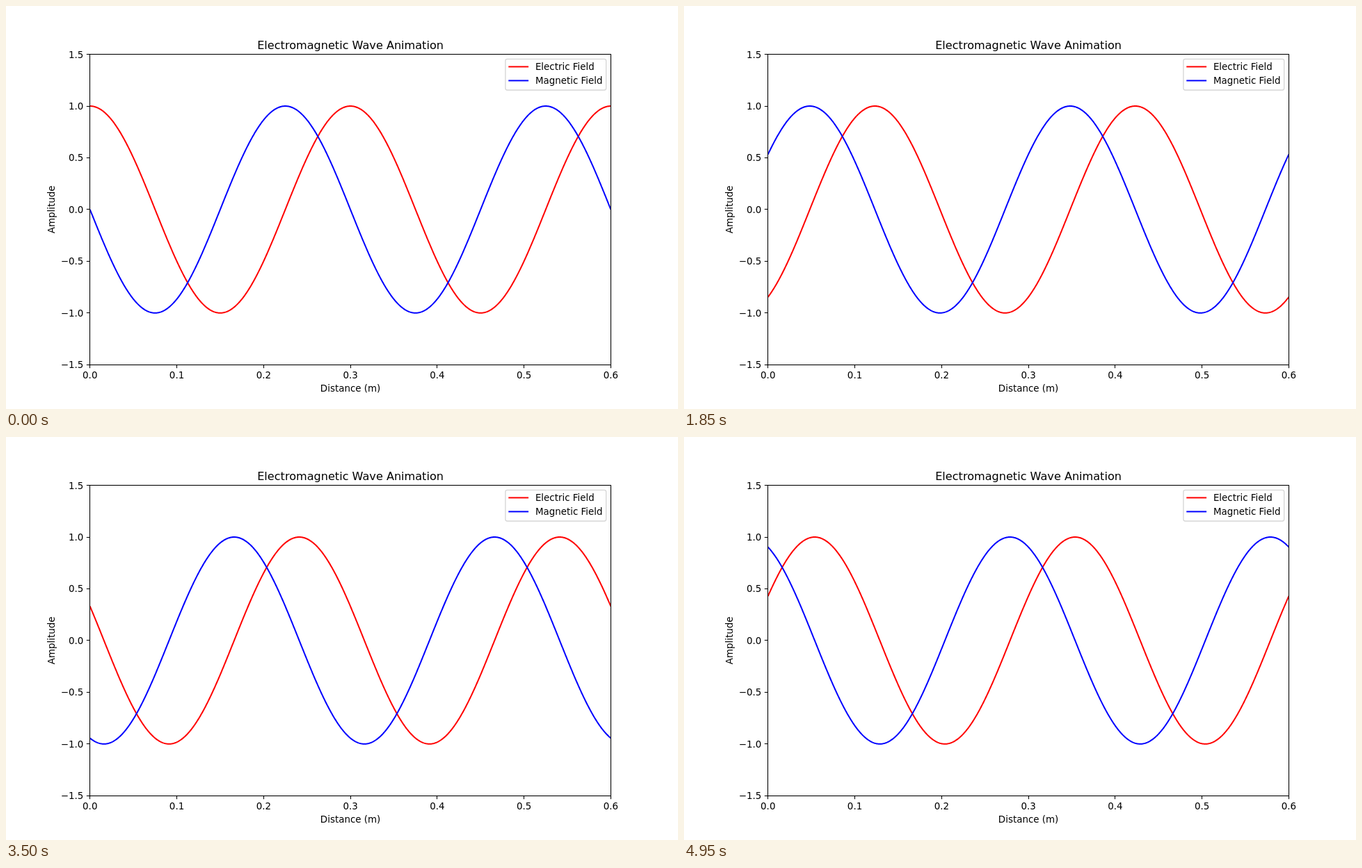
Write an HTML page with a canvas that moves like this. It is 966 by 580 pixels and loops after 5000 ms.

```html
<!DOCTYPE html>
<html lang="en">
<head>
<meta charset="utf-8">
<title>Electromagnetic Wave Animation</title>
<style>
  html, body { margin: 0; width: 100%; height: 100%; overflow: hidden; background: #fff; }
  canvas { display: block; }
</style>
</head>
<body>
<canvas id="stage" width="966" height="580"></canvas>
<script>
const ctx = document.getElementById('stage').getContext('2d');
const LOOP = 5000, STEP = 50;
const CYCLES_PER_STEP = 0.254337;
const WAVELENGTH = 0.3;
const PT = 966 / 720;
const FONT = 10 * PT;
const axes = { left: 120.75, right: 869.4, top: 69.6, bottom: 516.2 };
const RED = '#ff0000', BLUE = '#0000ff';

const toX = d => axes.left + d / 0.6 * (axes.right - axes.left);
const toY = a => axes.bottom - (a + 1.5) / 3 * (axes.bottom - axes.top);
const snap = v => Math.floor(v) + 0.5;

function line(x1, y1, x2, y2, color, width) {
  ctx.strokeStyle = color;
  ctx.lineWidth = width;
  ctx.beginPath();
  ctx.moveTo(x1, y1);
  ctx.lineTo(x2, y2);
  ctx.stroke();
}

function label(text, x, y, align = 'center', size = FONT) {
  ctx.font = `${size}px "DejaVu Sans", sans-serif`;
  ctx.textAlign = align;
  ctx.fillStyle = '#000';
  ctx.fillText(text, x, y);
}

function drawWave(fn, phase, color) {
  ctx.save();
  ctx.beginPath();
  ctx.rect(121, 70, 748, 446);
  ctx.clip();
  ctx.beginPath();
  for (let i = 0; i <= 1000; i++) {
    const d = 0.6 * i / 1000;
    ctx.lineTo(toX(d), toY(fn(2 * Math.PI * (phase - d / WAVELENGTH))));
  }
  ctx.strokeStyle = color;
  ctx.lineWidth = 1.5 * PT;
  ctx.lineJoin = 'round';
  ctx.stroke();
  ctx.restore();
}

function drawAxes() {
  const width = 0.8 * PT, tick = 3.5 * PT;
  const left = snap(axes.left), top = snap(axes.top), bottom = snap(axes.bottom);
  ctx.strokeStyle = '#000';
  ctx.lineWidth = width;
  ctx.strokeRect(left, top, snap(axes.right) - left, bottom - top);
  for (let i = 0; i <= 6; i++) {
    const d = i / 10, a = i / 2 - 1.5;
    const x = snap(toX(d)), y = snap(toY(a));
    line(x, bottom, x, bottom + tick, '#000', width);
    line(left, y, left - tick, y, '#000', width);
    label(d.toFixed(1), toX(d), 536);
    label(a.toFixed(1).replace('-', '\u2212'), axes.left - 7 * PT, Math.round(toY(a) + 4.9), 'right');
  }
  const midX = (axes.left + axes.right) / 2;
  label('Electromagnetic Wave Animation', midX, 61.5, 'center', 12 * PT);
  label('Distance (m)', midX, 555);
  ctx.save();
  ctx.translate(70, toY(0));
  ctx.rotate(-Math.PI / 2);
  label('Amplitude', 0, 0);
  ctx.restore();
}

function drawLegend() {
  ctx.beginPath();
  ctx.roundRect(717.9, 76.3, 144.8, 44.7, 2.7);
  ctx.fillStyle = 'rgba(255, 255, 255, 0.8)';
  ctx.fill();
  ctx.strokeStyle = 'rgba(204, 204, 204, 0.8)';
  ctx.lineWidth = PT;
  ctx.stroke();
  [['Electric Field', RED], ['Magnetic Field', BLUE]].forEach(([text, color], row) => {
    const y = 92 + 20 * row;
    line(722.3, y - 4.6, 751.1, y - 4.6, color, 1.5 * PT);
    label(text, 760.9, y, 'left');
  });
}

function draw(time) {
  const phase = Math.floor(time % LOOP / STEP) * CYCLES_PER_STEP;
  ctx.fillStyle = '#fff';
  ctx.fillRect(0, 0, 966, 580);
  drawWave(Math.cos, phase, RED);
  drawWave(Math.sin, phase, BLUE);
  drawAxes();
  drawLegend();
}

let start;
function tick(now) {
  start ??= now;
  draw(now - start);
  requestAnimationFrame(tick);
}
draw(0);
requestAnimationFrame(tick);
</script>
</body>
</html>
```
